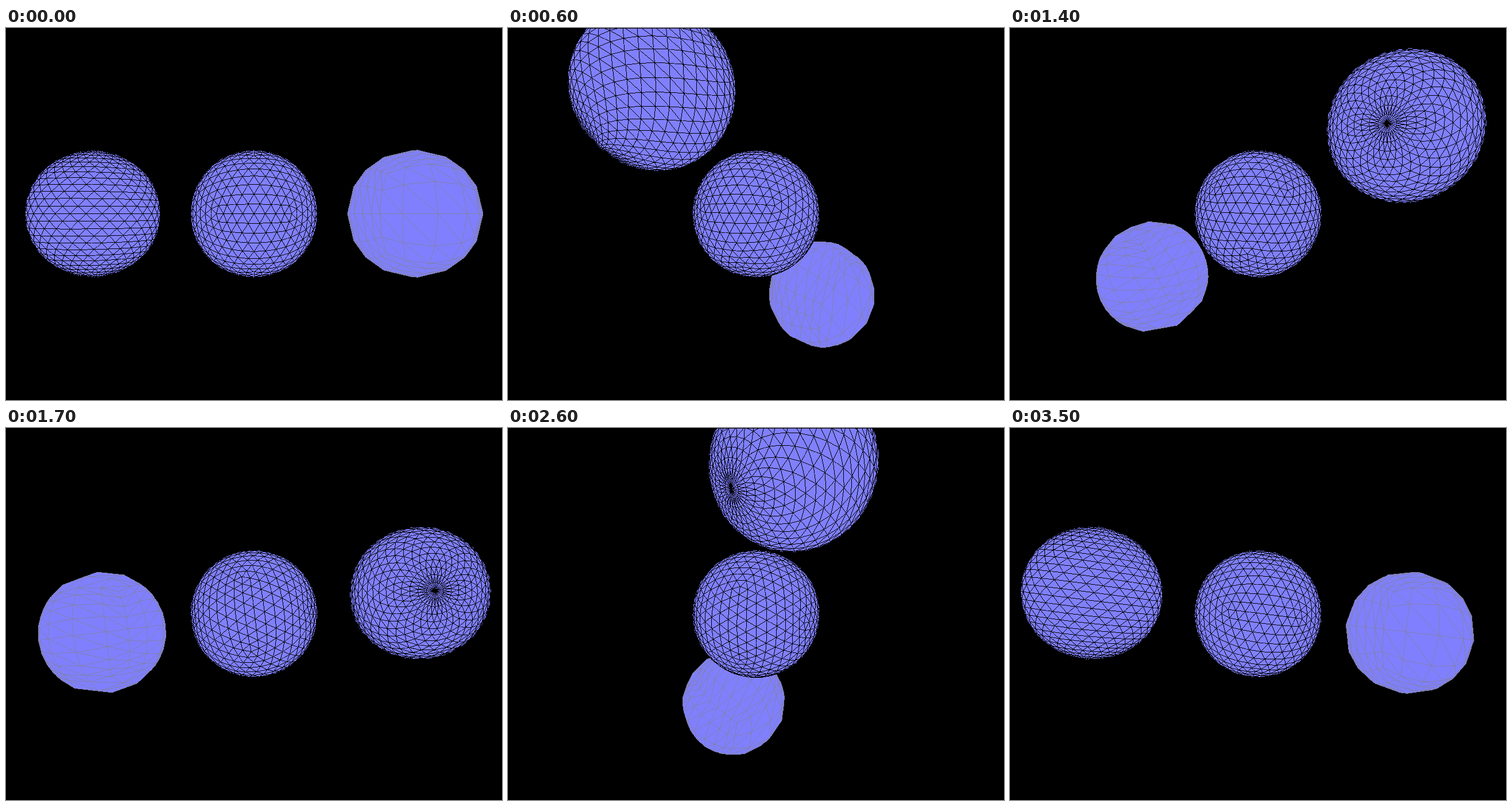
Recreate the animation shown at these times as an HTML page with a canvas. Size 864 by 648 pixels, loop 3.6 s.

```html
<!DOCTYPE html>
<html lang="en">
<head>
<meta charset="utf-8">
<title>Three sphere meshes</title>
<style>
  html, body { margin: 0; width: 100%; height: 100%; overflow: hidden; background: #000; }
  canvas { display: block; width: 864px; height: 648px; }
</style>
</head>
<body>
<canvas id="stage" width="864" height="648"></canvas>
<script>
const W = 864, H = 648;
const VIEW_TOP = 1, VIEW_H = 645;
const CX = W / 2, CY = VIEW_TOP + VIEW_H / 2;
const EYE = Math.sqrt(50);
const FOCAL = VIEW_H / 2 / Math.tan(Math.PI / 8);
const GAP = 2.5;
const STEP_MS = 100, TURN_STEPS = 18;

const ctx = document.getElementById('stage').getContext('2d');
const image = ctx.createImageData(W, H);
const pixels = new Uint32Array(image.data.buffer);

const rgb = (r, g, b) => (255 << 24 | b << 16 | g << 8 | r) >>> 0;
const BLACK = rgb(0, 0, 0), BLUE = rgb(128, 128, 255), GREY = rgb(128, 128, 176);

const sub = (a, b) => a.map((v, i) => v - b[i]);
const dot = (a, b) => a[0] * b[0] + a[1] * b[1] + a[2] * b[2];
const cross = (a, b) => [
  a[1] * b[2] - a[2] * b[1],
  a[2] * b[0] - a[0] * b[2],
  a[0] * b[1] - a[1] * b[0]
];
const unit = a => a.map(v => v / Math.hypot(...a));

// Latitude rings, every second one shifted by half a slice
function ringSphere(rings, slices) {
  const point = (j, i) => {
    const th = Math.PI * j / rings;
    const ph = 2 * Math.PI * (i + (j % 2) / 2) / slices;
    return [Math.sin(th) * Math.cos(ph), Math.cos(th), Math.sin(th) * Math.sin(ph)];
  };
  const tris = [];
  for (let j = 0; j < rings; j++) {
    const odd = j % 2;
    for (let i = 0; i < slices; i++) {
      const a = point(j, i), b = point(j, i + 1);
      const c = point(j + 1, i), d = point(j + 1, i + 1);
      if (j > 0) tris.push([a, b, odd ? d : c]);
      if (j < rings - 1) tris.push([odd ? a : b, c, d]);
    }
  }
  return tris;
}

// Icosahedron with each flat face cut into n * n triangles, then pushed out
function icoSphere(n) {
  const g = (1 + Math.sqrt(5)) / 2, verts = [], tris = [];
  for (const s of [-1, 1])
    for (const t of [-g, g]) verts.push([s, 0, t], [0, t, s], [t, s, 0]);
  const near = (p, q) => Math.abs(Math.hypot(...sub(p, q)) - 2) < 0.01;
  const split = (a, b, c) => {
    const point = (i, j) => unit(a.map((v, k) => v * (n - i - j) + b[k] * i + c[k] * j));
    for (let i = 0; i < n; i++)
      for (let j = 0; i + j < n; j++) {
        const p = point(i + 1, j), q = point(i, j + 1);
        tris.push([point(i, j), p, q]);
        if (i + j < n - 1) tris.push([p, point(i + 1, j + 1), q]);
      }
  };
  verts.forEach((a, i) => verts.forEach((b, j) => verts.forEach((c, k) => {
    if (i < j && j < k && near(a, b) && near(b, c) && near(a, c)) split(a, b, c);
  })));
  return tris;
}

// A box grid pushed out to the sphere
function boxSphere(cells) {
  const tris = [];
  for (const [u, v, w] of [[0, 1, 2], [0, 2, 1], [1, 2, 0]])
    for (const side of [-1, 1]) {
      const point = (i, j) => {
        const p = [];
        p[u] = 2 * i / cells[u] - 1;
        p[v] = 2 * j / cells[v] - 1;
        p[w] = side;
        return unit(p);
      };
      for (let i = 0; i < cells[u]; i++)
        for (let j = 0; j < cells[v]; j++) {
          const b = point(i + 1, j), c = point(i, j + 1);
          tris.push([point(i, j), b, c], [b, point(i + 1, j + 1), c]);
        }
    }
  return tris;
}

const balls = [
  { x: -GAP, tris: ringSphere(30, 30), ink: BLACK },
  { x: 0, tris: icoSphere(8), ink: BLACK },
  { x: GAP, tris: boxSphere([4, 4, 8]), ink: GREY }
];

// Rotation about the axis (0, 1, -1)
function turner(angle) {
  const c = Math.cos(angle), s = Math.sin(angle), h = Math.SQRT1_2;
  return ([x, y, z]) => {
    const along = (y - z) / 2 * (1 - c);
    return [
      x * c + h * (y + z) * s,
      y * c - h * x * s + along,
      z * c - h * x * s - along
    ];
  };
}

const project = ([x, y, z]) => {
  const k = FOCAL / (EYE - z);
  return [CX + x * k, CY - y * k];
};

function fillTriangle(pts, color) {
  const ys = pts.map(p => p[1]);
  const top = Math.max(VIEW_TOP, Math.ceil(Math.min(...ys) - 0.5));
  const end = Math.min(H - 1, Math.floor(Math.max(...ys) - 0.5));
  for (let y = top; y <= end; y++) {
    let left = Infinity, right = -Infinity;
    for (let i = 0; i < 3; i++) {
      const [ax, ay] = pts[i], [bx, by] = pts[(i + 1) % 3];
      const t = (y + 0.5 - ay) / (by - ay);
      if (t >= 0 && t <= 1) {
        const x = ax + t * (bx - ax);
        left = Math.min(left, x);
        right = Math.max(right, x);
      }
    }
    const x0 = Math.max(0, Math.ceil(left - 0.5));
    const x1 = Math.min(W - 1, Math.floor(right - 0.5));
    if (x0 <= x1) pixels.fill(color, y * W + x0, y * W + x1 + 1);
  }
}

// One-pixel line without smoothing
function drawLine([ax, ay], [bx, by], color) {
  const n = Math.max(1, Math.round(Math.max(Math.abs(bx - ax), Math.abs(by - ay))));
  for (let i = 0; i <= n; i++) {
    const x = Math.floor(ax + (bx - ax) * i / n);
    const y = Math.floor(ay + (by - ay) * i / n);
    if (x >= 0 && x < W && y >= VIEW_TOP && y < H) pixels[y * W + x] = color;
  }
}

function drawBall({ tris, ink }, center, turn) {
  const seen = [];
  for (const tri of tris) {
    const [a, b, c] = tri.map(turn);
    let normal = cross(sub(b, a), sub(c, a));
    if (dot(normal, a) < 0) normal = normal.map(v => -v);
    const place = p => p.map((v, i) => v + center[i]);
    if (dot(normal, sub([0, 0, EYE], place(a))) > 0)
      seen.push([a, b, c].map(p => project(place(p))));
  }
  seen.forEach(t => fillTriangle(t, BLUE));
  seen.forEach(t => t.forEach((p, i) => drawLine(p, t[(i + 1) % 3], ink)));
}

function render(step) {
  const turn = turner(step * Math.PI / TURN_STEPS);
  pixels.fill(BLACK);
  balls
    .map(ball => ({ ball, center: turn([ball.x, 0, 0]) }))
    .sort((p, q) => p.center[2] - q.center[2])
    .forEach(({ ball, center }) => drawBall(ball, center, turn));
  ctx.putImageData(image, 0, 0);
}

// Half a turn forward, then back again
const start = performance.now();
let shown = -1;
function tick() {
  const n = Math.floor((performance.now() - start) / STEP_MS) % (2 * TURN_STEPS);
  const step = Math.min(n, 2 * TURN_STEPS - n);
  if (step !== shown) render(shown = step);
  requestAnimationFrame(tick);
}
tick();
</script>
</body>
</html>
```
